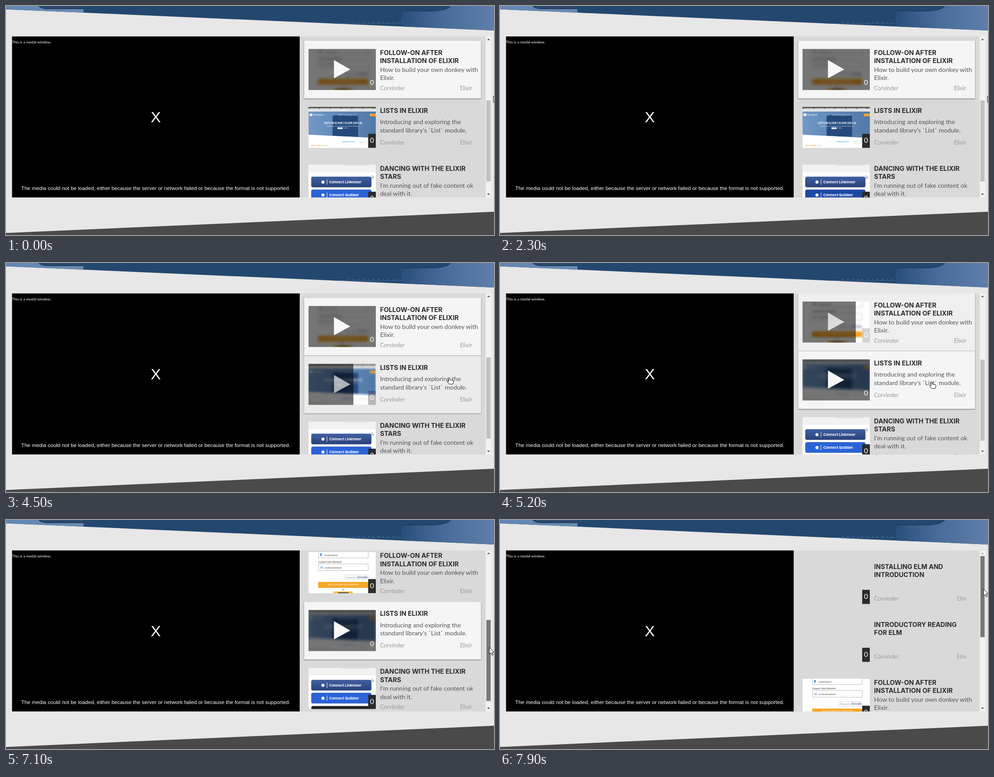
Animation, 1090 px wide and 514 px high, one loop 8 s. Source, as an HTML page:

```html
<!DOCTYPE html>
<html lang="en">
<head>
<meta charset="utf-8">
<title>Episode list</title>
<style>
  html, body { margin: 0; width: 100%; height: 100%; overflow: hidden; background: #e7e7e7; }
  svg { display: block; width: 1090px; height: 514px; }
  text { font-family: Lato, sans-serif; }
  .title { font: 700 14.35px Inter, sans-serif; fill: #2b2b2b; }
  .desc { font-size: 14px; fill: #555; }
  .meta { font-size: 12.6px; fill: #999; }
  .bold { font-family: Inter, sans-serif; font-weight: 700; }
  .arial { font-family: "Liberation Sans", Arial, sans-serif; }
  .white { fill: #fff; }
  .mid { text-anchor: middle; }
  .end { text-anchor: end; }
  .lit { filter: drop-shadow(0 1px 1.2px rgba(0, 0, 0, .55)); }
</style>
</head>
<body>
<svg viewBox="0 0 1090 514">
  <defs>
    <clipPath id="panelClip"><rect x="656" y="68.3" width="416" height="361.4"/></clipPath>
    <clipPath id="thumbClip"><rect width="150.5" height="92.2"/></clipPath>
    <clipPath id="heroClip"><path d="M0 0H1090V55L0 7.4Z"/></clipPath>
    <linearGradient id="heroLeft"><stop stop-color="#6485b3"/><stop offset="1" stop-color="#6b8ab4"/></linearGradient>
    <linearGradient id="heroRight"><stop stop-color="#2b4f7b"/><stop offset=".45" stop-color="#486b99"/><stop offset="1" stop-color="#5f7fab"/></linearGradient>
    <linearGradient id="sky"><stop stop-color="#7299c6"/><stop offset=".45" stop-color="#5f88b8"/><stop offset="1" stop-color="#5379a8"/></linearGradient>
    <linearGradient id="navy" x2="0" y2="1"><stop stop-color="#4060a4"/><stop offset="1" stop-color="#2b4178"/></linearGradient>
    <path id="arrow" d="M0 0V15L3.5 12 6 17.5 8.5 16.5 6 11H10.5Z" fill="#fff" stroke="#000" stroke-linejoin="round"/>
  </defs>

  <rect width="1090" height="514" fill="#e7e7e7"/>
  <g clip-path="url(#heroClip)">
    <rect width="1090" height="56" fill="#24476f"/>
    <rect width="173" height="56" fill="url(#heroLeft)"/>
    <path d="M72 0Q78 7 92 7H173V0Z" fill="#25415f"/>
    <path d="M80 2H173" stroke="#41638f"/>
    <path d="M885 56V11H955Q985 10 993 0H1090V56Z" fill="url(#heroRight)"/>
    <path d="M885 11H955Q985 10 993 0" fill="none" stroke="#1f3d63" stroke-width="2"/>
    <path d="M765 37H885" stroke="#4f729f" stroke-width="2" stroke-dasharray="2 9"/>
    <path d="M700 39.5H885V25" fill="none" stroke="#3f628f"/>
  </g>
  <path d="M0 509.4L1090 461.8V514H0Z" fill="#4a4a4a"/>

  <rect x="13.5" y="68.3" width="642.5" height="361.4"/>
  <text class="white" x="13.5" y="84" font-size="8.45">This is a modal window.</text>
  <text class="white arial mid" x="334.5" y="261" font-size="33.8">X</text>
  <text class="white arial mid" x="334.5" y="413" font-size="11.82">The media could not be loaded, either because the server or network failed or because the format is not supported.</text>

  <rect x="656" y="68.3" width="416" height="361.4" fill="#d9d9d9"/>
  <g clip-path="url(#panelClip)"><g id="list"></g></g>

  <rect x="1071.5" y="68.3" width="12.5" height="361.4" fill="#f1f1f1"/>
  <rect id="grip" x="1073" width="9.5" height="182"/>
  <path id="up" d="M1074.5 76.5L1077.8 73 1081 76.5Z"/>
  <path id="down" d="M1074.5 421L1077.8 424.5 1081 421Z"/>

  <g id="pointer">
    <use id="pointerArrow" href="#arrow"/>
    <path id="pointerHand" fill="#fff" stroke="#000" stroke-linejoin="round"
      d="M-1.5 8V1Q0-1 1.5 1V5L8 6Q9.5 6.5 9.5 8V11L8 14.5H0L-4.5 9.5Q-4.5 7.5-1.5 9Z"/>
  </g>
</svg>
<script>
const $ = id => document.getElementById(id);
const LOOP = 8000, CARD_HEIGHT = 130, MAX_SCROLL = 307.5;

const box = (x, y, w, h, fill, extra = "") =>
  `<rect x="${x}" y="${y}" width="${w}" height="${h}" fill="${fill}" ${extra}/>`;
const label = (x, y, text, size, fill, cls = "") =>
  `<text class="${cls}" x="${x}" y="${y}" ${size ? `font-size="${size}"` : ""} ${fill ? `fill="${fill}"` : ""}>${text}</text>`;

const signupThumb = () => {
  const outline = 'stroke="#aaa" stroke-width=".8"';
  return box(0, 0, 151, 93, "#fff")
    + box(22.5, -4, 111, 17, "#fff", outline)
    + '<path d="M28 10L25.8 6A2.3 2.3 0 1 1 30.2 6Z" fill="#4a90d9"/>'
    + label(36, 9, "asdasdasd", 6.4, "#555")
    + label(22, 24, "Coupon Code (Optional)", 4.9, "#333")
    + box(22.5, 26.5, 111, 15, "#fff", outline)
    + '<path d="M26 32L33 37M26 37L33 32" stroke="#4a90d9"/>'
    + label(36, 37, "asdasdasdasd", 6.4, "#555")
    + box(80.5, 51.5, 53, 10.5, "#fff", 'rx="1.5" stroke="#c5ccd8" stroke-width=".8"')
    + label(84, 58.5, "Powered by", 4.8, "#8792a5")
    + label(110, 59, "brindo", 7, "#6b7a94", "bold")
    + box(22, 68, 111.5, 12, "#d98d14", 'rx="1.5"')
    + box(22, 67, 111.5, 12, "#f8a623", 'rx="1.5"')
    + label(77.5, 75, "SIGN UP FOR $22/MONTH", 5.6, "#fff", "mid")
    + label(77.5, 86, "or", 6, "#444", "mid")
    + box(56, 88.5, 43, 8, "#fbb92f", 'rx="2"') + box(66, 90.5, 24, 3, "#2c3550");
};

const lessonThumb = () =>
  box(0, 0, 151, 93, "#fff") + box(0, 0, 151, 5, "#4a4a46")
  + '<path d="M2 4H150" stroke="#c9ccc8" stroke-width="2" stroke-dasharray="22 2"/>'
  + box(0, 5, 151, 5.5, "#eceeef")
  + '<path d="M3 7.5H70M85 7.5H145" stroke="#c3cbd0"/>'
  + '<path d="M0 10.5H151V70L0 62.5Z" fill="url(#sky)"/>'
  + '<path d="M58 19H107Q111 19 111 23V67.5L54 64.7V23Q54 19 58 19Z" fill="#24497a"/>'
  + '<circle cx="5.5" cy="18" r="3" fill="#fff"/>'
  + label(9.5, 20, "NoonSplat", 5.2, "#fff")
  + label(67, 19.5, "Topics   Pricing   Blog   Account", 3.4, "#e5eefa")
  + box(137, 15.5, 14, 5.5, "#f5a623")
  + label(77, 39, "LISTS IN ELIXIR | ELIXIR [001.4]", 5.6, "#fff", "bold mid")
  + label(77, 44.5, "Introducing and exploring the standard library's", 3.6, "#dce8f5", "mid")
  + box(65, 46, 11, 4, "#fff") + label(70.5, 49.2, "`List`", 3.5, "#20497b", "mid") + label(77, 49.2, "module.", 3.6, "#dce8f5")
  + label(75, 80, "DOWNLOAD THIS EP", 2.9, "#3f79bd")
  + box(116, 77, 16, 4.5, "#fff", 'stroke="#bbb" stroke-width=".6"')
  + label(5, 89, "Lists in Elixir", 5, "#e9ad4a") + label(34, 89, "[001.4]", 3.5, "#aaa");

const connectButton = (y, fill, text, extra = "") =>
  box(6.5, y, 134, 23.5, fill, `rx="3.5" stroke="#1d3570" stroke-opacity=".4" ${extra}`)
  + `<circle cx="32.5" cy="${y + 12}" r="3.5" fill="#fff"/>`
  + box(41, y + 6, 1, 12, "#fff") + label(46.5, y + 14.8, text, 8, "#fff", "bold");

const connectThumb = () =>
  box(0, 0, 151, 93, "#fff") + box(0, 0, 151, 17, "#f2f2f2")
  + box(76, -3, 60, 4, "#fff", 'rx="2" stroke="#aaa" stroke-width=".6"')
  + connectButton(27, "url(#navy)", "Connect Linkmoor")
  + connectButton(56, "#2a63d8", "Connect Quibber", 'id="blueButton"')
  + box(6.5, 85.5, 134, 23, "#222", 'rx="3.5"')
  + '<use href="#arrow" transform="translate(142 24) scale(.4)"/>';

const cards = [
  { title: ["INSTALLING ELM AND", "INTRODUCTION"], topic: "Elm" },
  { title: ["INTRODUCTORY READING", "FOR ELM"], topic: "Elm" },
  { title: ["FOLLOW-ON AFTER", "INSTALLATION OF ELIXIR"], desc: ["How to build your own donkey with", "Elixir."], topic: "Elixir", thumb: signupThumb },
  { title: ["LISTS IN ELIXIR"], desc: ["Introducing and exploring the", "standard library's `List` module."], topic: "Elixir", thumb: lessonThumb },
  { title: ["DANCING WITH THE ELIXIR", "STARS"], desc: ["I'm running out of fake content ok", "deal with it."], topic: "Elixir", thumb: connectThumb },
];

const cardMarkup = ({ title, desc = [], topic, thumb }, i) => {
  const tall = title.length > 1 && desc.length;
  const descTop = title.length > 1 ? 69.5 : 57;
  const metaY = tall ? 110.5 : 102.5;
  return `<g transform="translate(666 ${78 + i * CARD_HEIGHT})">
    <rect class="lit" width="395" height="${CARD_HEIGHT - .5}" fill="#f5f5f5"/>
    <g transform="translate(9.5 18.3)" clip-path="url(#thumbClip)">
      <g class="image">${thumb ? thumb() : ""}</g>
      <rect class="shade" height="93" fill="#000" fill-opacity=".54"/>
      <path class="play" d="M57 24.9L93.5 46 57 66Z" fill="#f7f7f7"/>
      <rect class="badge" x="133.5" y="60.5" width="17" height="32" fill="#2b2b2b"/>
      ${label(142, 80.5, "0", 15.5, "#fff", "mid")}
    </g>
    ${title.map((line, n) => label(169.5, 31.5 + n * 18.7, line, 0, "", "title")).join("")}
    ${desc.map((line, n) => label(169.5, descTop + n * 18.6, line, 0, "", "desc")).join("")}
    ${label(169.5, metaY, "Corvinder", 0, "", "meta")}
    ${label(375, metaY, topic, 0, "", "meta end")}
  </g>`;
};

$("list").innerHTML = cards.map(cardMarkup).join("");
const cardNodes = [...$("list").children];

// Linear interpolation over [time, value] pairs.
const track = (keys, t) => {
  const next = keys.findIndex(key => key[0] > t);
  if (next === 0) return keys[0][1];
  if (next < 0) return keys[keys.length - 1][1];
  const [t0, v0] = keys[next - 1], [t1, v1] = keys[next];
  return v0 + (v1 - v0) * (t - t0) / (t1 - t0);
};

const scrollKeys = [[5000, 260], [5200, 270], [5600, MAX_SCROLL], [7000, MAX_SCROLL], [7400, 214.5], [7900, 0]];
const hoverKeys = {
  2: [[5075, 1], [5675, 0]],
  3: [[4100, 0], [4700, 1]],
  4: [[6150, 0], [6300, .21], [6450, 0]],
};
const pointerX = [[3200, 1089], [3900, 1086], [4000, 1072], [4100, 1042], [4700, 964], [5900, 964], [6300, 1062], [6600, 1079], [7400, 1080]];
const pointerY = [[3200, 202], [3900, 211], [4000, 225], [4100, 238], [4700, 267], [5900, 267], [6300, 307], [6600, 300], [7000, 298], [7400, 250], [7900, 155]];

function setHover(node, amount) {
  const part = name => node.querySelector("." + name);
  part("lit").setAttribute("opacity", amount);
  part("image").style.filter = amount ? `blur(${3 * amount}px)` : "none";
  part("shade").setAttribute("width", 150.5 * amount);
  part("play").setAttribute("opacity", amount);
  part("badge").setAttribute("opacity", 1 - amount);
}

function render(t) {
  const scroll = track(scrollKeys, t);
  $("list").setAttribute("transform", `translate(0 ${-scroll})`);
  cardNodes.forEach((node, i) => setHover(node, hoverKeys[i] ? track(hoverKeys[i], t) : 0));

  const dim = track([[1800, 0], [2300, 1], [2500, 1], [2700, 0]], t);
  $("blueButton").setAttribute("fill", `rgb(${42 - 14 * dim},${99 - 27 * dim},${216 - 51 * dim})`);

  const x = track(pointerX, t), y = track(pointerY, t);
  const overCard = x < 1061;
  $("pointer").setAttribute("transform", `translate(${x} ${y})`);
  $("pointerHand").setAttribute("visibility", overCard ? "visible" : "hidden");
  $("pointerArrow").setAttribute("visibility", overCard ? "hidden" : "visible");

  const overBar = x >= 1072 && x <= 1084;
  $("grip").setAttribute("y", 81 + scroll * .504);
  $("grip").setAttribute("fill", t >= 7000 ? "#787878" : overBar ? "#a8a8a8" : "#c1c1c1");
  $("up").setAttribute("fill", scroll > 0 ? "#505050" : "#a3a3a3");
  $("down").setAttribute("fill", scroll < MAX_SCROLL ? "#505050" : "#a3a3a3");
}

const start = performance.now();
function tick() {
  render(Math.floor((performance.now() - start) % LOOP / 100) * 100);
  requestAnimationFrame(tick);
}
tick();
</script>
</body>
</html>
```
